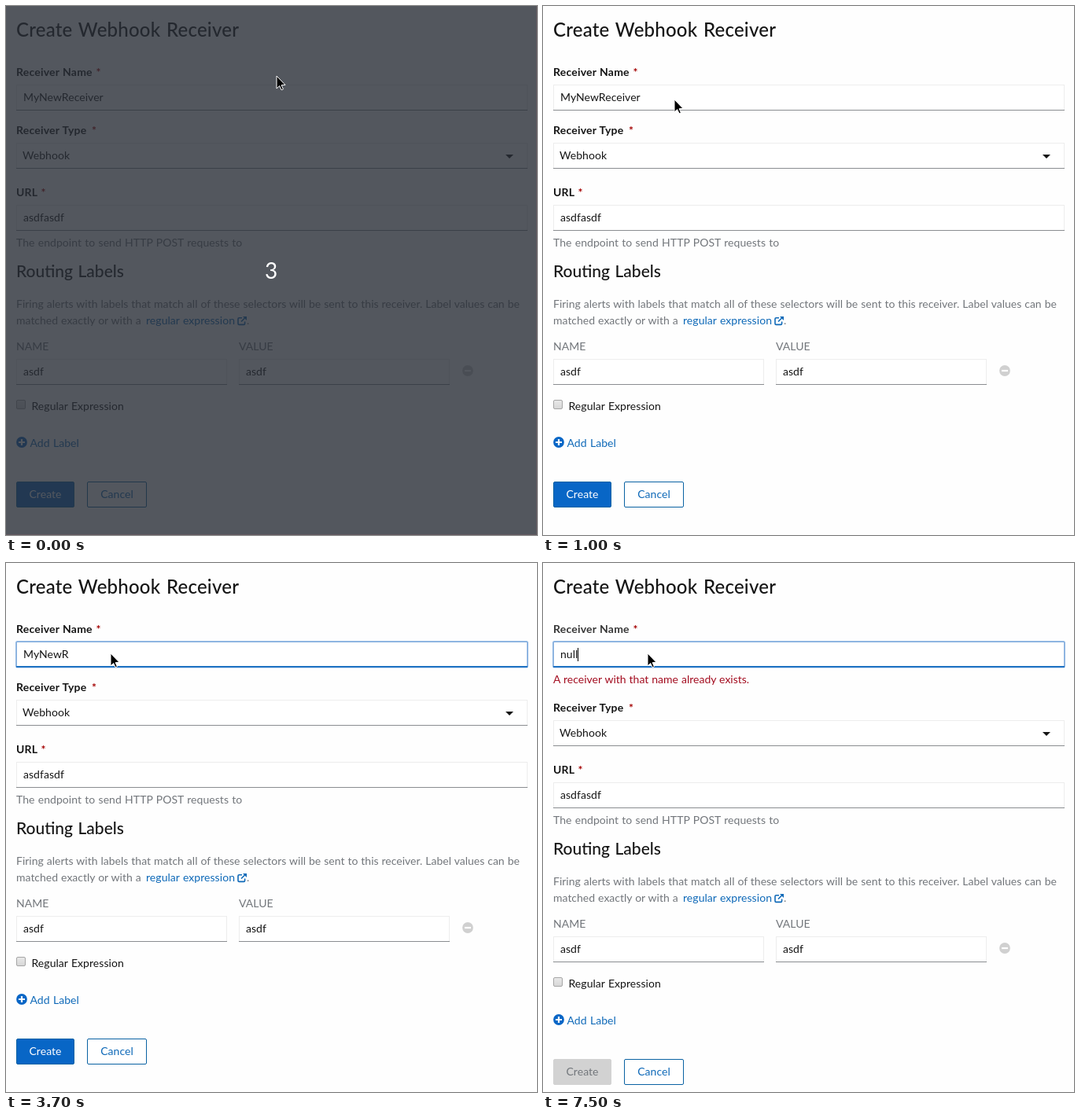
An HTML page for the animation above (8000 ms loop, 675x673 px).

```html
<!DOCTYPE html>
<html lang="en">
<head>
<meta charset="utf-8">
<title>Create Webhook Receiver</title>
<style>
html, body { margin: 0; width: 100%; height: 100%; overflow: hidden; background: #fefefe; }
svg { display: block; width: 675px; height: 673px; }
text { font: 400 14px Lato, sans-serif; letter-spacing: .05px; word-spacing: .6px; fill: #151515; white-space: pre; }
.h1 { font-size: 24px; font-weight: 500; letter-spacing: .22px; word-spacing: 1.4px; }
.h2 { font-size: 21px; font-weight: 500; letter-spacing: 0; word-spacing: 1.2px; }
.label { font-weight: 700; letter-spacing: .2px; }
.req { font-weight: 700; fill: #a30000; }
.muted { fill: #72767b; }
.prose { letter-spacing: 0; word-spacing: .4px; }
.link { fill: #0e69b8; }
.error { fill: #a30d20; }
.mid { text-anchor: middle; }
.count { font-size: 28px; fill: #fff; letter-spacing: 0; }
.line { fill: none; stroke: #0e69b8; stroke-width: 1.6; }
</style>
</head>
<body>
<svg id="stage" viewBox="0 0 675 673">
  <defs>
    <linearGradient id="shade" x2="0" y2="1">
      <stop stop-color="#e9e9e9"/><stop offset="1" stop-color="#d6d6d6"/>
    </linearGradient>
  </defs>
  <rect width="675" height="673" fill="#fefefe"/>
  <g id="top"></g>
  <g id="ring">
    <path d="M13 132H663" stroke="#0e69b8" stroke-width="2"/>
    <rect x="13" y="100" width="650" height="32.5" rx="1.5" fill="none" stroke="#3b82d2" stroke-opacity=".55" stroke-width="2"/>
  </g>
  <text id="value" x="22" y="121"></text>
  <rect id="caret" y="108" width="1" height="17"/>
  <text id="error" class="error prose" x="13" y="153">A receiver with that name already exists.</text>
  <g id="form"></g>
  <g id="veil">
    <rect width="675" height="673" fill="#292d36" fill-opacity=".8"/>
    <path d="M674.5 0V672.5H0" fill="none" stroke="#63585f"/>
    <text id="count" class="count mid" x="337" y="347"></text>
  </g>
  <path id="pointer" d="M0 0V16L3.7 12.6 6.1 17.8 8.4 16.8 6.1 11.7 11 11.4Z" fill="#000" stroke="#fff"/>
</svg>
<script>
const $ = id => document.getElementById(id);
const LOOP = 8000;
const BLUE = '#0866c6', EDGE = '#0a62a3', GREY = '#d2d2d2';

const text = (x, y, cls, s, id = '') => `<text id="${id}" x="${x}" y="${y}" class="${cls}">${s}</text>`;
const field = (x, y, w) =>
  `<rect x="${x + .5}" y="${y + .5}" width="${w - 1}" height="32" fill="#fff" stroke="#ededed"/>
   <path d="M${x} ${y + 32.5}h${w}" stroke="#8a8d90"/>`;
const button = (x, w, id) =>
  `<rect id="${id}" x="${x + .5}" y="605.5" width="${w - 1}" height="32" rx="1.5" fill="#fff" stroke="${EDGE}"/>`;
const badge = (x, y, color, bars) =>
  `<circle cx="${x}" cy="${y}" r="6.9" fill="${color}"/><path d="${bars}" stroke="#fff" stroke-width="2.2"/>`;

$('top').innerHTML =
  text(13, 39, 'h1', 'Create Webhook Receiver') +
  text(13, 89, 'label', 'Receiver Name', 'name') + text(114.5, 89, 'req', '*') +
  field(13, 100, 650);

$('form').innerHTML =
  text(13, 163, 'label', 'Receiver Type') + text(109, 163, 'req', '*') +
  field(13, 174, 650) + text(21, 195, '', 'Webhook') +
  '<path d="M635 189h10l-5 5z" fill="#151515"/>' +
  text(13, 242, 'label', 'URL') + text(44.5, 242, 'req', '*') +
  field(13, 253, 650) + text(22, 274, '', 'asdfasdf') +
  text(13, 306, 'muted', 'The endpoint to send HTTP POST requests to') +
  text(13, 345, 'h2', 'Routing Labels') +
  text(13, 384, 'muted prose', 'Firing alerts with labels that match all of these selectors will be sent to this receiver. Label values can be') +
  text(13, 405, 'muted prose', 'matched exactly or with a') +
  text(178, 405, 'link', 'regular expression') +
  '<path class="line" d="M300 396.8h-3.6q-1.4 0-1.4 1.4v5.8q0 1.4 1.4 1.4h5.8q1.4 0 1.4-1.4v-2.6M299 401.5l5-5"/>' +
  '<path class="link" d="M301 395h5v5z"/>' +
  text(306, 405, 'muted', '.') +
  text(13, 438, 'muted', 'NAME') + text(296, 438, 'muted', 'VALUE') +
  field(13, 449, 268) + text(22, 470, '', 'asdf') +
  field(296, 449, 268) + text(305, 470, '', 'asdf') +
  badge(587, 464, '#d0d0d0', 'M583 464h8') +
  '<rect x="13.5" y="501.5" width="11" height="11" rx="1.5" fill="url(#shade)" stroke="#a6a6a6"/>' +
  text(32.5, 514, '', 'Regular Expression') +
  badge(20, 555, BLUE, 'M16 555h8M20 551v8') + text(30.5, 561, 'link', 'Add Label') +
  button(13, 74, 'submit') + text(50, 626, 'mid', 'Create', 'create') +
  button(103, 76, 'cancel') + text(141, 626, 'link mid', 'Cancel');

// time, typed value, caret shown
const full = 'MyNewReceiver';
const cut = n => full.slice(0, n);
const typing = [
  [0, full, 0], [1600, full, 1], [2600, full, 0], [2700, cut(12), 1], [2800, cut(11), 1],
  [2900, cut(10), 0], [3000, cut(10), 1], [3400, cut(9), 0], [3500, cut(8), 0],
  [3600, cut(7), 0], [3700, cut(6), 0], [4000, cut(5), 0], [4100, cut(4), 1],
  [4300, cut(3), 1], [5000, cut(1), 0], [5100, '', 0], [5900, '', 1], [6200, '', 0],
  [6500, 'n', 1], [7000, 'nu', 0], [7500, 'null', 1]
];

// time, x, y
const path = [[600, 344, 89], [1100, 146, 123], [1200, 146, 123], [1500, 133, 115]];

function pointerAt(t) {
  const tick = Math.floor(t / 100) * 100;
  const i = path.findIndex(p => tick < p[0]);
  if (i === 0) return path[0].slice(1);
  if (i < 0) return path[path.length - 1].slice(1);
  const [t0, x0, y0] = path[i - 1], [t1, x1, y1] = path[i];
  const u = (tick - t0) / (t1 - t0), k = u * u * (3 - 2 * u);
  return [Math.round(x0 + (x1 - x0) * k), Math.round(y0 + (y1 - y0) * k)];
}

const show = (id, on) => $(id).setAttribute('visibility', on ? 'visible' : 'hidden');

function draw(t) {
  const [, value, caret] = typing.filter(s => s[0] <= t).pop();
  const taken = value === 'null', enabled = value && !taken;
  $('value').textContent = value;
  $('caret').setAttribute('x', 22 + (value ? Math.round($('value').getComputedTextLength()) : 0));
  show('caret', caret);
  show('ring', t >= 1500);
  show('error', taken);
  $('form').setAttribute('transform', `translate(0 ${taken ? 26 : 0})`);
  $('name').style.fill = taken ? '#363636' : '';
  $('submit').style.fill = enabled ? BLUE : GREY;
  $('submit').style.stroke = enabled ? EDGE : GREY;
  $('create').style.fill = enabled ? '#fff' : '#72767b';
  $('veil').style.display = t < 600 ? '' : 'none';
  $('count').textContent = t < 500 ? '3' : '1';
  $('pointer').setAttribute('transform', `translate(${pointerAt(t)})`);
}

const start = performance.now();
function frame() {
  draw((performance.now() - start) % LOOP);
  requestAnimationFrame(frame);
}
frame();
</script>
</body>
</html>
```
